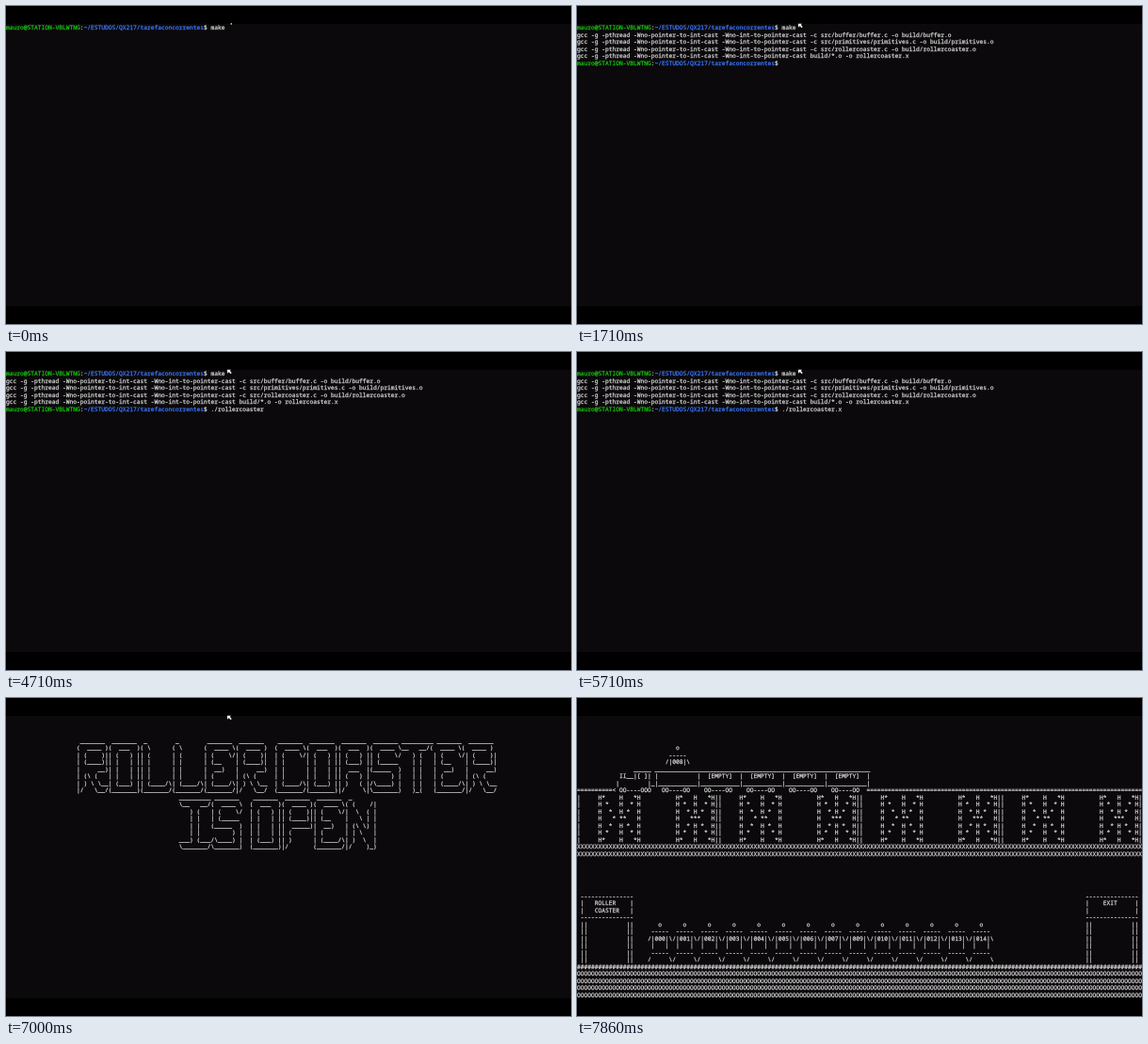
An HTML page that plays this animation: 600 px wide and 338 px high, repeating every 8000 ms.

```html
<!DOCTYPE html>
<html lang="en">
<head>
<meta charset="utf-8">
<title>Terminal: roller coaster</title>
<style>
  html, body { margin: 0; width: 100%; height: 100%; overflow: hidden; background: #000; }
  #term { position: absolute; left: 0; top: 19px; width: 600px; height: 300px; overflow: hidden; background: #0b090b; }
  /* 160 x 40 cells of 15 x 30, shown at a quarter of the size */
  #text {
    position: absolute; left: 0; top: -0.25px; margin: 0; width: 2400px; height: 1200px;
    transform: scale(.25); transform-origin: 0 0;
    font: 25px/30px "Noto Sans Mono", "DejaVu Sans Mono", monospace;
    font-variant-ligatures: none; text-rendering: geometricPrecision;
    white-space: pre; color: #d4d4d4; -webkit-text-stroke: 1px currentColor;
  }
  .user { color: #16c60c; }
  .path { color: #3b78ff; }
  #mouse { position: absolute; left: 0; top: 0; }
</style>
</head>
<body>
<div id="term"><pre id="text"></pre></div>
<svg id="mouse" width="600" height="338" viewBox="0 0 600 338">
  <rect id="dot" x="238.6" y="18.2" width="1.4" height="1.5" fill="#ddd"/>
  <path id="arrow" d="M234.8 18.7h4.2l-1.1 1.4 1.8 2.1-1.2 1.1-1.9-2.1-1.5 1.5z" fill="#eee"/>
</svg>
<script>
const LOOP = 8000, COLS = 160, ROWS = 40;
const USER = 'mauro@STATION-VBLWTNG';
const PATH = '~/ESTUDOS/QX217/tarefaconcorrentes';
const PROMPT = USER + ':' + PATH + '$';

const text = document.getElementById('text');
const dot = document.getElementById('dot');
const arrow = document.getElementById('arrow');

// Block letters, nine cells wide and eight rows high
const GLYPHS = {
  R: String.raw`
 _______
(  ____ )
| (    )|
| (____)|
|     __)
| (\ (
| ) \ \__
|/   \__/`,
  O: String.raw`
 _______
(  ___  )
| (   ) |
| |   | |
| |   | |
| |   | |
| (___) |
(_______)`,
  L: String.raw`
 _
( \
| (
| |
| |
| |
| (____/\
(_______/`,
  E: String.raw`
 _______
(  ____ \
| (    \/
| (__
|  __)
| (
| (____/\
(_______/`,
  C: String.raw`
 _______
(  ____ \
| (    \/
| |
| |
| |
| (____/\
(_______/`,
  A: String.raw`
 _______
(  ___  )
| (   ) |
| (___) |
|  ___  |
| (   ) |
| )   ( |
|/     \|`,
  S: String.raw`
 _______
(  ____ \
| (    \/
| (_____
(_____  )
      ) |
/\____) |
\_______)`,
  T: String.raw`
_________
\__   __/
   ) (
   | |
   | |
   | |
   | |
   )_(`,
  I: String.raw`
_________
\__   __/
   ) (
   | |
   | |
   | |
___) (___
\_______/`,
  P: String.raw`
 _______
(  ____ )
| (    )|
| (____)|
|  _____)
| (
| )
|/`,
  N: String.raw`
 _
( (    /|
|  \  ( |
|   \ | |
| (\ \) |
| | \   |
| )  \  |
|/    )_)`
};

const blank = () => Array.from({ length: ROWS }, () => Array(COLS).fill(' '));

function put(grid, row, col, str) {
  [...str].forEach((ch, i) => { if (col + i < COLS) grid[row][col + i] = ch; });
}

// Neighbouring backslashes print as one, as an escaped pair does
function word(grid, row, col, str) {
  const letters = [...str].map(ch => ch === ' ' ? null : GLYPHS[ch].slice(1).split('\n'));
  for (let i = 0; i < 8; i++) {
    const line = letters.map(rows => rows ? rows[i].padEnd(9) : '  ').join('');
    put(grid, row + i, col, line.replace(/\\\\/g, '\\'));
  }
}

const FLAGS = 'gcc -g -pthread -Wno-pointer-to-int-cast -Wno-int-to-pointer-cast ';
const BUILD = [
  '-c src/buffer/buffer.c -o build/buffer.o',
  '-c src/primitives/primitives.c -o build/primitives.o',
  '-c src/rollercoaster.c -o build/rollercoaster.o',
  'build/*.o -o rollercoaster.x'
];

// Shell with some build lines; the second prompt appears once typed is given
function shell(lines, typed) {
  const grid = blank();
  put(grid, 0, 0, PROMPT + ' make');
  BUILD.slice(0, lines).forEach((line, i) => put(grid, i + 1, 0, FLAGS + line));
  if (typed !== undefined) put(grid, 5, 0, PROMPT + ' ' + typed);
  return grid;
}

function banner() {
  const grid = blank();
  word(grid, 3, 20, 'ROLLER COASTER');
  word(grid, 11, 49, 'IS OPEN');
  return grid;
}

function train(grid) {
  put(grid, 7, 16, '_'.repeat(5));
  put(grid, 7, 22, '_'.repeat(61));
  put(grid, 8, 12, 'II__|[ ]|');
  put(grid, 9, 11, '|        |_');
  put(grid, 10, 0, '='.repeat(10) + '< OO----OOO');
  for (let i = 0; i < 5; i++) {
    const col = 22 + i * 12;
    put(grid, 8, col, i ? '|  [EMPTY]' : '|');
    put(grid, 9, col, '|' + '_'.repeat(11));
    put(grid, 10, col + 2, 'OO----OO');
  }
  put(grid, 8, 82, '|');
  put(grid, 9, 82, '|');
  put(grid, 10, 82, '='.repeat(78));
}

// The left cross of each bay is one cell wider than the right one
function trestle(grid) {
  const wide = ['H*    H   *H', 'H *   H  * H', 'H  *  H *  H', 'H   * **   H'];
  const narrow = ['H*   H   *H', 'H *  H  * H', 'H  * H *  H', 'H   ***   H'];
  for (let i = 0; i < 7; i++) {
    const k = 3 - Math.abs(3 - i);
    const bay = '|     ' + wide[k] + ' '.repeat(10) + narrow[k] + '|';
    put(grid, 11 + i, 0, bay.repeat(4));
  }
}

function booth(grid, col, lines) {
  const edge = '-'.repeat(15);
  put(grid, 25, col, edge);
  lines.forEach((line, i) => put(grid, 26 + i, col, '|' + line.padEnd(13) + '|'));
  put(grid, 28, col, edge);
  for (let row = 29; row < 35; row++) put(grid, row, col, '||' + ' '.repeat(11) + '||');
}

function person(grid, row, col, id, legs) {
  put(grid, row, col + 3, 'o');
  put(grid, row + 1, col + 1, '-----');
  put(grid, row + 2, col, '/|' + String(id).padStart(3, '0') + '|\\');
  if (!legs) return;
  put(grid, row + 3, col + 1, '|   |');
  put(grid, row + 4, col + 1, '-----');
  put(grid, row + 5, col, '/     \\');
}

function park(boarding) {
  const grid = blank();
  train(grid);
  trestle(grid);
  [18, 19].forEach(row => put(grid, row, 0, 'X'.repeat(COLS)));
  booth(grid, 1, ['   ROLLER', '   COASTER']);
  booth(grid, 144, ['    EXIT', '']);
  for (let i = 0; i < 14; i++) person(grid, 29, 20 + i * 7, i < 8 ? i : i + 1, true);
  if (boarding) person(grid, 4, 25, 8, false);
  put(grid, 35, 0, '#'.repeat(COLS));
  for (let row = 36; row < ROWS; row++) put(grid, row, 0, 'O'.repeat(COLS));
  return grid;
}

// [start in ms, screen, dot opacity, arrow shown]
const STEPS = [
  [0, shell(0), 1, false],
  [140, shell(0), .5, false],
  [430, shell(0), 0, false],
  [1290, shell(1), 0, true],
  [1430, shell(2), 0, true],
  [1570, shell(3), 0, true],
  [1710, shell(4, ''), 0, true],
  [3000, shell(4, '.'), 0, true],
  [3290, shell(4, './'), 0, true],
  [3570, shell(4, './r'), 0, true],
  [3710, shell(4, './ro'), 0, true],
  [3860, shell(4, './rol'), 0, true],
  [4000, shell(4, './roll'), 0, true],
  [4140, shell(4, './rollercoaster'), 0, true],
  [5000, shell(4, './rollercoaster.'), 0, true],
  [5290, shell(4, './rollercoaster.x'), 0, true],
  [5860, banner(), 0, true],
  [7430, park(false), 0, false],
  [7570, park(true), 0, false]
];

const colored = `<span class="user">${USER}</span>:<span class="path">${PATH}</span>$`;

function toHtml(grid) {
  return grid.map(row => row.join('').trimEnd()
    .replace(/</g, '&lt;')
    .replace(PROMPT, () => colored)).join('\n');
}

const pages = STEPS.map(step => toHtml(step[1]));
let shown = -1;

function draw() {
  const t = performance.now() % LOOP;
  let i = STEPS.length - 1;
  while (STEPS[i][0] > t) i--;
  if (i !== shown) {
    shown = i;
    text.innerHTML = pages[i];
    dot.style.opacity = STEPS[i][2];
    arrow.style.opacity = STEPS[i][3] ? 1 : 0;
  }
  requestAnimationFrame(draw);
}
draw();
</script>
</body>
</html>
```
